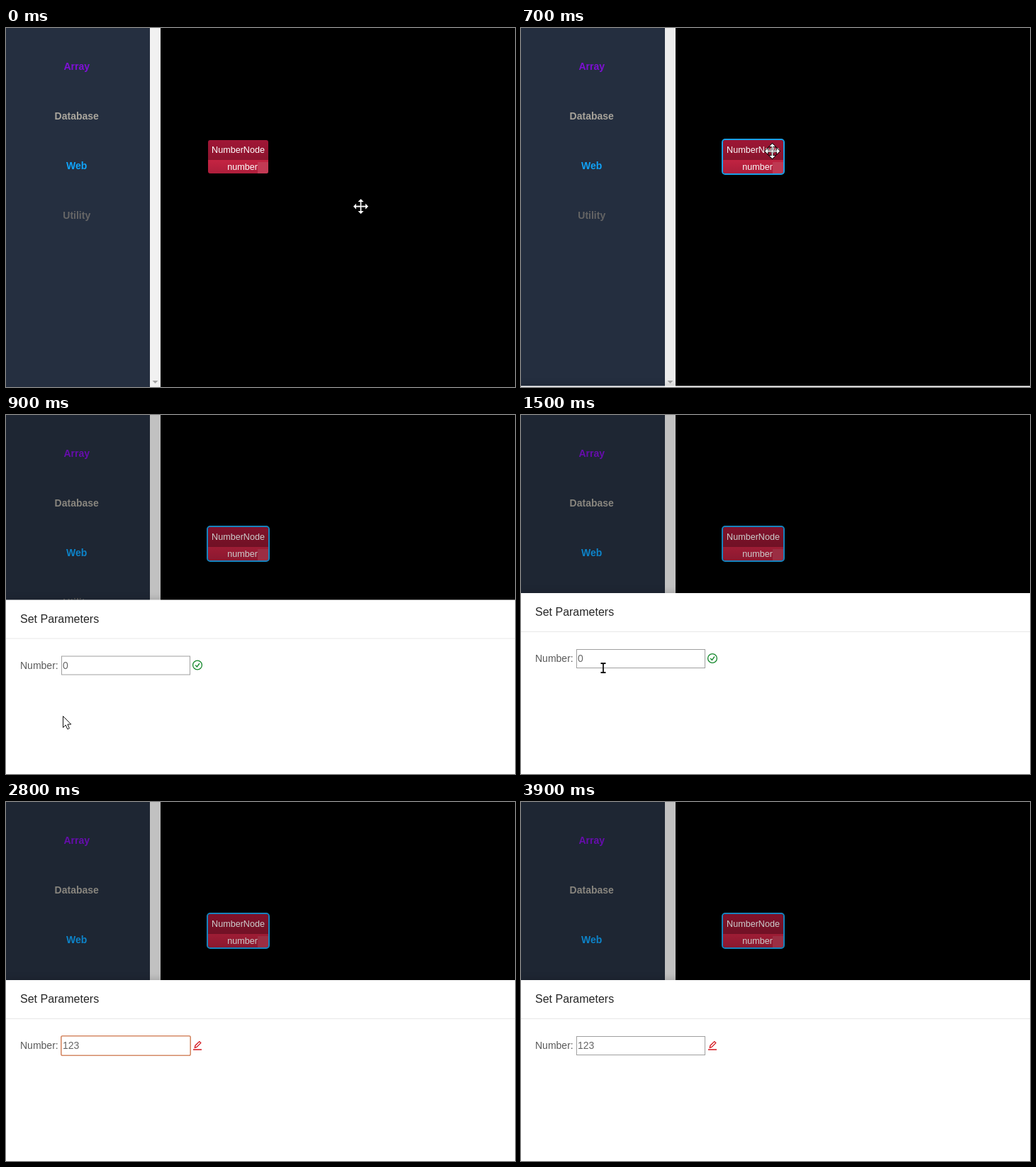
Animation of 718x506 px, one loop 4000 ms. Source, as an HTML page:

```html
<!DOCTYPE html>
<html lang="en">
<head>
<meta charset="utf-8">
<title>Node parameters</title>
<style>
  html, body { margin: 0; width: 100%; height: 100%; overflow: hidden; background: #000; }
  svg { display: block; font: 14px "Liberation Sans", Arial, sans-serif; }
  .menu { font-weight: bold; text-anchor: middle; }
  .node { font-size: 12.6px; fill: #fff; text-anchor: middle; }
  #panel { filter: drop-shadow(0 -2px 4px rgba(0, 0, 0, .15)); }
  .icon { fill: none; stroke-width: 1.3; }
</style>
</head>
<body>
<svg width="718" height="506" viewBox="0 0 718 506">
  <defs>
    <linearGradient id="head" x2="0" y2="1"><stop stop-color="#a01636"/><stop offset="1" stop-color="#8c152e"/></linearGradient>
    <linearGradient id="body" x2="0" y2="1"><stop stop-color="#c52442"/><stop offset="1" stop-color="#ad1e3b"/></linearGradient>
    <clipPath id="round"><rect x="285" y="158" width="85" height="47" rx="3"/></clipPath>
    <path id="arm" d="M-.7 0V-6.5H-4L0-10.5 4-6.5H.7V0z"/>
  </defs>

  <rect width="718" height="506"/>
  <rect width="203" height="506" fill="#252f40"/>
  <rect x="203" width="15" height="506" fill="#f1f1f1"/>
  <path d="M206.5 497h8l-4 4z" fill="#a3a3a3"/>
  <g class="menu">
    <text x="99.75" y="59" fill="#7f10d6">Array</text>
    <text x="99.75" y="129" fill="#aaa69d">Database</text>
    <text x="99.75" y="199" fill="#10a4fa">Web</text>
    <text x="99.75" y="269" fill="#666">Utility</text>
  </g>

  <g clip-path="url(#round)">
    <rect x="285" y="158" width="85" height="28" fill="url(#head)"/>
    <rect x="285" y="186" width="85" height="19" fill="url(#body)"/>
    <rect x="355" y="189" width="15" height="16" fill="#c23a54"/>
  </g>
  <rect id="selected" x="284" y="157" width="87" height="49" rx="4" fill="none" stroke="#1ca3ec" stroke-width="2"/>
  <text class="node" x="327.5" y="176">NumberNode</text>
  <text class="node" x="333.5" y="200">number</text>

  <rect id="mask" width="718" height="506"/>

  <g id="panel">
    <rect width="718" height="520" fill="#fff"/>
    <rect y="54" width="718" height="1" fill="#e8e8e8"/>
    <text x="20" y="32" font-size="16" fill="#262626">Set Parameters</text>
    <text x="20" y="97" fill="#595959">Number:</text>
    <rect x="78.5" y="79.5" width="181" height="26" fill="#fff" stroke="#a0a0a0"/>
    <rect id="ring" x="77.8" y="78.8" width="182.4" height="27.4" rx="2" fill="#fff" stroke="#d58a66" stroke-width="1.6"/>
    <rect id="highlight" x="80" y="84" width="8" height="16" fill="#3390ff"/>
    <text id="value" x="80" y="97"></text>
    <rect id="caret" x="103" y="84" width="1" height="16" fill="#333"/>
    <g id="ok" class="icon" stroke="#12872a">
      <circle cx="270" cy="92" r="6.4"/>
      <path d="M267.2 92l2.2 2.5 3.6-5"/>
    </g>
    <g id="edit" class="icon" stroke="#d4161e">
      <path d="M264 98H276M266.3 95.2l.7-3 5.8-5.6 2 2-5.8 5.8z"/>
    </g>
  </g>

  <g id="move" fill="#fff" stroke="#000" stroke-width="1.6" paint-order="stroke">
    <use href="#arm"/><use href="#arm" transform="rotate(90)"/>
    <use href="#arm" transform="rotate(180)"/><use href="#arm" transform="rotate(270)"/>
    <path d="M-6 0H6M0-6V6" stroke="#fff" stroke-width="1.4"/>
  </g>
  <path id="arrow" d="M.5.5V16.5L4.2 13 6.8 18.8 9.4 17.6 6.9 12H11.8z" fill="#fff" stroke="#111" stroke-width="1"/>
  <path id="beam" d="M-3.5-6.5H-1L0-5.5 1-6.5H3.5M0-5.5V5.5M-3.5 6.5H-1L0 5.5 1 6.5H3.5" fill="none" stroke="#111" stroke-width="1.8"/>
</svg>
<script>
const $ = id => document.getElementById(id);
const show = (id, on) => $(id).setAttribute('visibility', on ? 'visible' : 'hidden');
const place = (id, x, y) => $(id).setAttribute('transform', `translate(${x} ${y})`);

// Steps last 100 ms each.
const panelTops = [504.5, 314, 260.5, 252, 251];
const pointer = {
  8: [258, 296], 9: [80, 424], 10: [72, 423], 11: [76, 408], 12: [84, 390], 13: [97, 372],
  14: [110, 356], 15: [116, 356.5], 16: [116, 350], 17: [116, 345],
  25: [115, 350], 26: [82, 240], 27: [31, 74]
};

function drawPointer(step) {
  const kind = step < 8 ? 'move' : step > 13 && step < 25 ? 'beam' : 'arrow';
  for (const id of ['move', 'arrow', 'beam']) show(id, id === kind && step < 28);
  if (kind === 'move') {
    const t = step / 7, e = t * t * (3 - 2 * t);
    place('move', 500.5 - 146 * e, 251.5 - 78 * e);
  } else if (step < 28) {
    place(kind, ...pointer[kind === 'beam' ? Math.min(step, 17) : step]);
  }
}

function draw() {
  const step = Math.floor(performance.now() % 4000 / 100);
  const open = step >= 7, edited = step >= 21, selected = step >= 17 && !edited;
  show('selected', open);
  $('mask').setAttribute('opacity', step > 7 ? .2 : open ? .02 : 0);
  show('panel', open);
  place('panel', 0, open ? panelTops[Math.min(step - 7, 4)] : 506);

  show('ring', step >= 16 && step < 39);
  show('highlight', selected);
  $('value').textContent = step < 21 ? '0' : step < 22 ? '12' : '123';
  $('value').setAttribute('fill', selected ? '#fff' : '#666');
  // An explicit "visible" would show through the hidden panel.
  show('ok', open && !edited);
  show('edit', edited);
  show('value', open);
  show('caret', step >= 22 && step < 27 || step >= 34 && step < 39);
  drawPointer(step);
  requestAnimationFrame(draw);
}
draw();
</script>
</body>
</html>
```
